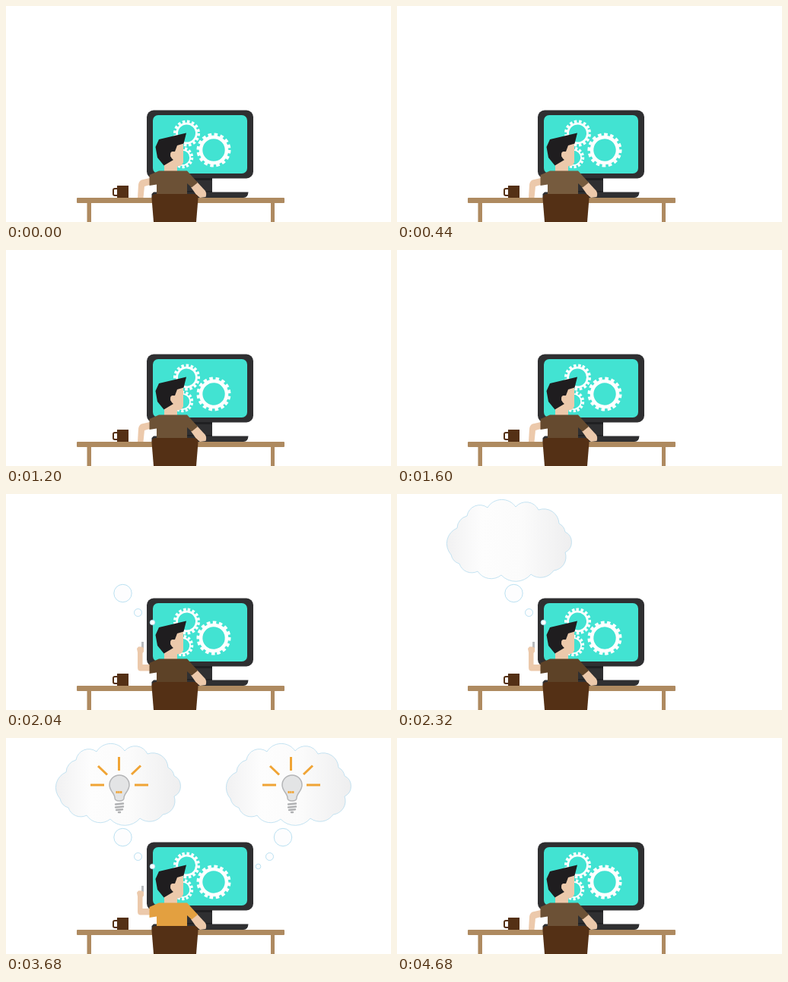
Write an HTML page that moves like this. It is 506 px wide and 285 px high and loops after 4.72 s.

```html
<!DOCTYPE html>
<html lang="en">
<head>
<meta charset="utf-8">
<title>Idea at the desk</title>
<style>
  html, body { margin: 0; width: 100%; height: 100%; overflow: hidden; background: #fff; }
  svg { display: block; width: 506px; height: 285px; }
  .skin { fill: #ecc9ab; }
  .dark { fill: #2f2f31; }
  .wood { fill: #ae8a60; }
  .cocoa { fill: #543015; }
  .air { fill: #fdfdfe; stroke: #a9d8ee; stroke-width: .8; }
  .ray { stroke: #f0a435; stroke-width: 3; fill: none; }
</style>
</head>
<body>
<svg viewBox="0 0 506 285">
  <defs>
    <linearGradient id="mist">
      <stop offset="0" stop-color="#f1f1f2"/>
      <stop offset=".28" stop-color="#fdfdfd"/>
      <stop offset=".6" stop-color="#fbfbfb"/>
      <stop offset="1" stop-color="#eeeeef"/>
    </linearGradient>
    <path id="cloud" fill="url(#mist)" stroke="#b5dcef" stroke-width=".8" d="M79 45A17 17 0 0 1 92 29A17 17 0 0 1 119 18A22 22 0 0 1 156 17A18 18 0 0 1 186 21A20 20 0 0 1 213 39A15 15 0 0 1 221 50A15 15 0 0 1 221 77A18 18 0 0 1 206 101A21 21 0 0 1 176 106A26 26 0 0 1 137 107A21 21 0 0 1 106 102A17 17 0 0 1 82 92A16 16 0 0 1 71 80A22 22 0 0 1 79 45Z"/>
    <g id="bulb">
      <path fill="#e3e4e5" stroke="#b4b5b7" stroke-width="1.5" d="M136 62A13 13 0 1 1 162 62C162 70 155 73 155 79Q155 83 149 83Q143 83 143 79C143 73 136 70 136 62Z"/>
      <path stroke="#b0b1b3" stroke-width="2.4" stroke-linecap="round" d="M144 87.5L154 86.5M144 91.5L154 90.5M145 95L153 94.2M148 98H150"/>
    </g>
    <g id="glow">
      <path class="ray" d="M148.5 25V43M121 37L133 48.500M177 36.500L165 48M111 62H129M169 62H187"/>
      <path stroke="#f0a435" stroke-width="3" stroke-dasharray="2.2 .6" d="M144.500 71.500H153"/>
    </g>
  </defs>

  <rect class="dark" x="185" y="137.500" width="140" height="90" rx="9"/>
  <rect x="193" y="144" width="124" height="77" rx="7" fill="#42e3d2"/>
  <g id="gears" fill="none" stroke="#fff"></g>
  <path fill="#202022" d="M238 227H271V246H238Z"/>
  <path class="dark" d="M238 230H271V244H238ZM194 245.500H318.500Q318 253 312 253H191.500V248Z"/>

  <rect class="wood" x="93" y="253" width="273" height="7" rx="1"/>
  <path class="wood" d="M106.500 260H112V285H106.500ZM348 260H353V285H348Z"/>
  <path class="cocoa" d="M146 237H161V253H146Z"/>
  <rect x="141" y="241" width="8" height="9" rx="2" fill="none" stroke="#543015" stroke-width="2"/>

  <path id="rest" class="skin" d="M189 227L178 229.500Q174.500 231 174 236L173 253H180.500L182 238L189 236Z"/>
  <g id="point">
    <path fill="#babcbf" d="M178 195H181V205H178Z"/>
    <path class="skin" d="M189 233.500H176Q173 233 173 229V209L172 204L174 201.500H178L181 203V208L179.500 210V225H189Z"/>
  </g>
  <path class="skin" d="M243 239L251 232L262 244Q264 247 262.500 252L255 253L250 249Z"/>
  <path class="skin" d="M208 205L217 190L225 183L233 181.500V206Q232 211 225 211.500V219H208Z"/>
  <path fill="#1f1d1f" d="M237 167.500L201 176L196.500 186L199 200L207.500 210.500L220 203L216 198L218 193L222 192L225 184L233.500 181.500Z"/>
  <path class="skin" d="M222 192.500Q216 190.500 216 196Q217 202 221 203Z"/>
  <path id="shirt" d="M201 217.500H238L252 233L244 239.500L238 234V250H198V235.500L188.500 237V223Z"/>
  <path class="cocoa" d="M191.500 254Q191.500 248 197 248H247Q252.500 248 252.500 254L250 285H194Z"/>
  <g id="thoughts"></g>
</svg>
<script>
const LOOP = 4720, STEP = 40, GEARS_STOP = 2680, ARM_UP = 1680, LIT = 2520;
const $ = id => document.getElementById(id);

function add(parent, tag, attrs) {
  const el = document.createElementNS('http://www.w3.org/2000/svg', tag);
  for (const key in attrs) el.setAttribute(key, attrs[key]);
  return parent.appendChild(el);
}

// Each gear: centre, outer radius, hole radius, tooth count, turning speed in degrees per second
const gears = [
  [237.5, 168, 17.5, 11.5, 16, -42],
  [232, 200, 14.2, 9.2, 14, 48],
  [273, 190, 22.5, 14.7, 16, 42]
].map(([cx, cy, outer, hole, teeth, speed]) => {
  const el = add($('gears'), 'g', {});
  const rim = outer - 3.2;
  add(el, 'circle', { cx, cy, r: (rim + hole) / 2, 'stroke-width': rim - hole });
  const r = outer - 1.8, pitch = 2 * Math.PI * r / teeth;
  add(el, 'circle', {
    cx, cy, r, 'stroke-width': 3.6,
    'stroke-dasharray': `${pitch * .56} ${pitch * .44}`
  });
  return { el, cx, cy, speed };
});

// Parts of the two thoughts, with the moment each one pops in
const parts = [];
const pop = (at, tag, attrs) => parts.push({ at, el: add($('thoughts'), tag, attrs) });
const bubble = (at, cx, cy, r) => pop(at, 'circle', { class: 'air', cx, cy, r });
const stamp = (at, id, x) => pop(at, 'use', { href: '#' + id, x });

bubble(1720, 192.5, 169.5, 3.3);
bubble(1880, 173.5, 156.5, 5);
bubble(2040, 153.5, 131, 11.7);
stamp(2200, 'cloud', 0);
stamp(2360, 'bulb', 0);
stamp(LIT, 'glow', 0);
bubble(2840, 331.5, 169.5, 3.3);
bubble(3040, 346.5, 156.5, 5);
bubble(3200, 364, 131, 11.7);
stamp(3360, 'cloud', 224);
stamp(3520, 'bulb', 227);
stamp(3680, 'glow', 226);

// Shirt shade drifts until the idea lights it up
const shades = [
  [0, [108, 81, 54]], [440, [118, 91, 62]], [1200, [109, 82, 54]],
  [2040, [93, 66, 39]], [LIT, [93, 66, 39]]
];

function shirtColour(t) {
  if (t >= LIT) return 'rgb(227,160,64)';
  const i = shades.findIndex(([at]) => at > t);
  const [t0, a] = shades[i - 1], [t1, b] = shades[i];
  const k = (t - t0) / (t1 - t0);
  return `rgb(${a.map((v, n) => Math.round(v + (b[n] - v) * k))})`;
}

const show = (el, on) => { el.style.display = on ? '' : 'none'; };

function draw(now) {
  const time = Math.floor(now % LOOP / STEP) * STEP;
  const t = time >= 4680 ? 0 : time;
  for (const { el, cx, cy, speed } of gears) {
    el.setAttribute('transform', `rotate(${speed * Math.min(t, GEARS_STOP) / 1000} ${cx} ${cy})`);
  }
  for (const { el, at } of parts) show(el, t >= at);
  show($('rest'), t < ARM_UP);
  show($('point'), t >= ARM_UP);
  $('shirt').setAttribute('fill', shirtColour(t));
}

const start = performance.now();
function tick() {
  draw(performance.now() - start);
  requestAnimationFrame(tick);
}
tick();
</script>
</body>
</html>
```
